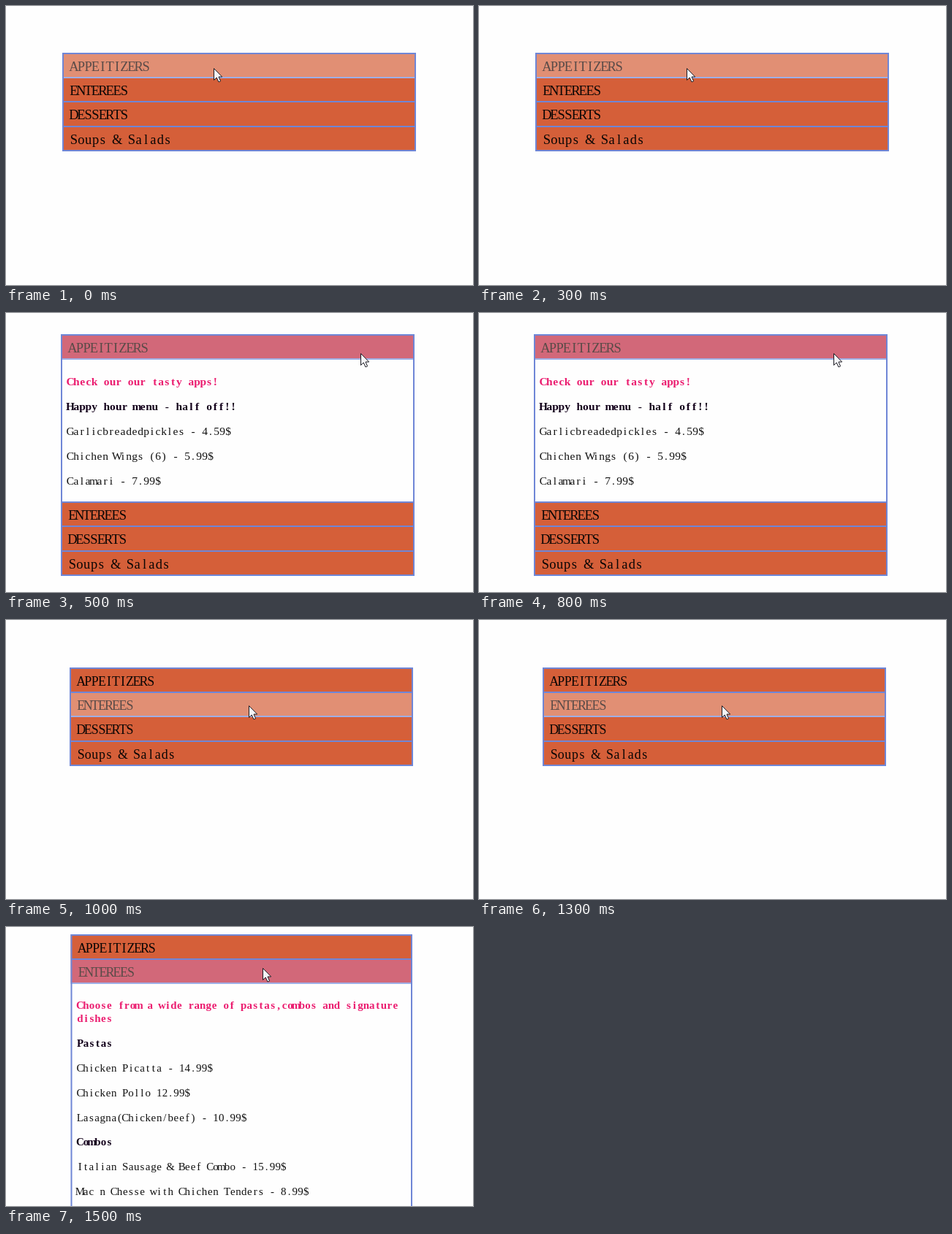
Animation of 639x382 px, one loop 2 s. Source, as an HTML page:

```html
<!DOCTYPE html>
<html lang="en">
<head>
<meta charset="utf-8">
<title>Menu accordion</title>
<style>
html, body { margin: 0; width: 100%; height: 100%; overflow: hidden; background: #fefefe; }
svg { display: block; width: 639px; height: 382px; }
text { font-family: "Liberation Serif", "Noto Serif", serif; text-anchor: middle; white-space: pre; }
</style>
</head>
<body>
<svg id="stage" viewBox="0 0 639 382"></svg>
<script>
const NS = "http://www.w3.org/2000/svg";
const stage = document.getElementById("stage");
const LINE = "#6f86d6", LIGHT = "#9fafe5";
const ORANGE = "#d55f39", HOVER = "#e18f74", ACTIVE = "#d26879", PINK = "#eb1c6f";
const HOLD = 500, ROW = 33.35;
const TITLES = ["APPEITIZERS", "ENTEREES", "DESSERTS", "Soups & Salads"];

// Body lines: [baseline offset from the top of the panel, text, style]
const apps = [
  [37, "Check our our tasty apps!", "lead"],
  [71, "Happy hour menu - half off!!", "bold"],
  [105, "Garlicbreadedpickles - 4.59$"],
  [139, "Chichen Wings (6) - 5.99$"],
  [173, "Calamari - 7.99$"]
];
const mains = [
  [36, "Choose from a wide range of pastas,combos and signature", "lead"],
  [54, "dishes", "lead"],
  [88, "Pastas", "bold"],
  [122, "Chicken Picatta - 14.99$"],
  [156, "Chicken Pollo 12.99$"],
  [190, "Lasagna(Chicken/beef) - 10.99$"],
  [223, "Combos", "bold"],
  [257, "Italian Sausage & Beef Combo - 15.99$"],
  [291, "Mac n Chesse with Chichen Tenders - 8.99$"]
];

const steps = [
  { x: 77, y: 64, w: 484, zoom: 1, hover: 0, cursor: [284, 85] },
  { x: 75, y: 29, w: 484, zoom: 1, hover: 0, body: apps, height: 196, cursor: [485, 55] },
  { x: 87, y: 65, w: 470, zoom: 0.967, hover: 1, cursor: [332, 117] },
  { x: 88.5, y: 10, w: 467.5, zoom: 0.967, hover: 1, body: mains, height: 360, cursor: [351, 56] }
];

function add(parent, tag, attrs, text) {
  const node = document.createElementNS(NS, tag);
  for (const key in attrs) node.setAttribute(key, attrs[key]);
  if (text) node.textContent = text;
  return parent.appendChild(node);
}

function rect(g, x, y, width, height, fill) {
  add(g, "rect", { x, y, width, height, fill });
}

// Fixed-pitch text: every letter is centred in its own cell
function write(g, x, y, text, size, pitch, fill, weight = 400) {
  const cells = Array.from(text, (_, i) => (x + (i + 0.5) * pitch).toFixed(2)).join(" ");
  add(g, "text", { x: cells, y, fill, "font-size": size, "font-weight": weight }, text);
}

function drawBody(g, s, top) {
  for (const [dy, text, style] of s.body) {
    const fill = style === "lead" ? PINK : style ? "#12001a" : "#111";
    write(g, s.x + 9, top + dy, text, 15.5 * s.zoom, (style ? 8.26 : 8) * s.zoom, fill, style ? 700 : 400);
  }
}

function drawCursor(g, [x, y]) {
  add(g, "path", {
    d: "M.5.5V16.5L4.2 13L7 19L9.6 17.8L7 12H11.7Z",
    transform: `translate(${x} ${y})`,
    fill: "#f4f4f6", stroke: "#1c1c24", "stroke-width": 1, "stroke-linejoin": "round"
  });
}

function build(s) {
  const g = add(stage, "g", { display: "none" });
  let y = s.y;
  rect(g, s.x, y, s.w, 2, LINE);
  TITLES.forEach((title, i) => {
    const dim = i === s.hover;
    const top = Math.floor(y), bottom = Math.floor(y + ROW);
    rect(g, s.x, top + 2, s.w, bottom - top - 2, dim ? (s.body ? ACTIVE : HOVER) : ORANGE);
    rect(g, s.x, bottom, s.w, 2, dim ? LIGHT : LINE);
    write(g, s.x + 11, top + 24.5, title, 18.5 * s.zoom, 9.86 * s.zoom, dim ? "#5a4b48" : "#0a0605");
    y += ROW;
    if (dim && s.body) {
      drawBody(g, s, bottom);
      y += s.height;
      rect(g, s.x, Math.floor(y), s.w, 2, LINE);
    }
  });
  const height = Math.floor(y) + 2 - s.y;
  rect(g, s.x, s.y, 2, height, LINE);
  rect(g, s.x + s.w - 2, s.y, 2, height, LINE);
  drawCursor(g, s.cursor);
  return g;
}

const scenes = steps.map(build);
const start = performance.now();

function tick() {
  const now = Math.floor((performance.now() - start) / HOLD) % scenes.length;
  scenes.forEach((g, i) => g.setAttribute("display", i === now ? "inline" : "none"));
  requestAnimationFrame(tick);
}
tick();
</script>
</body>
</html>
```
